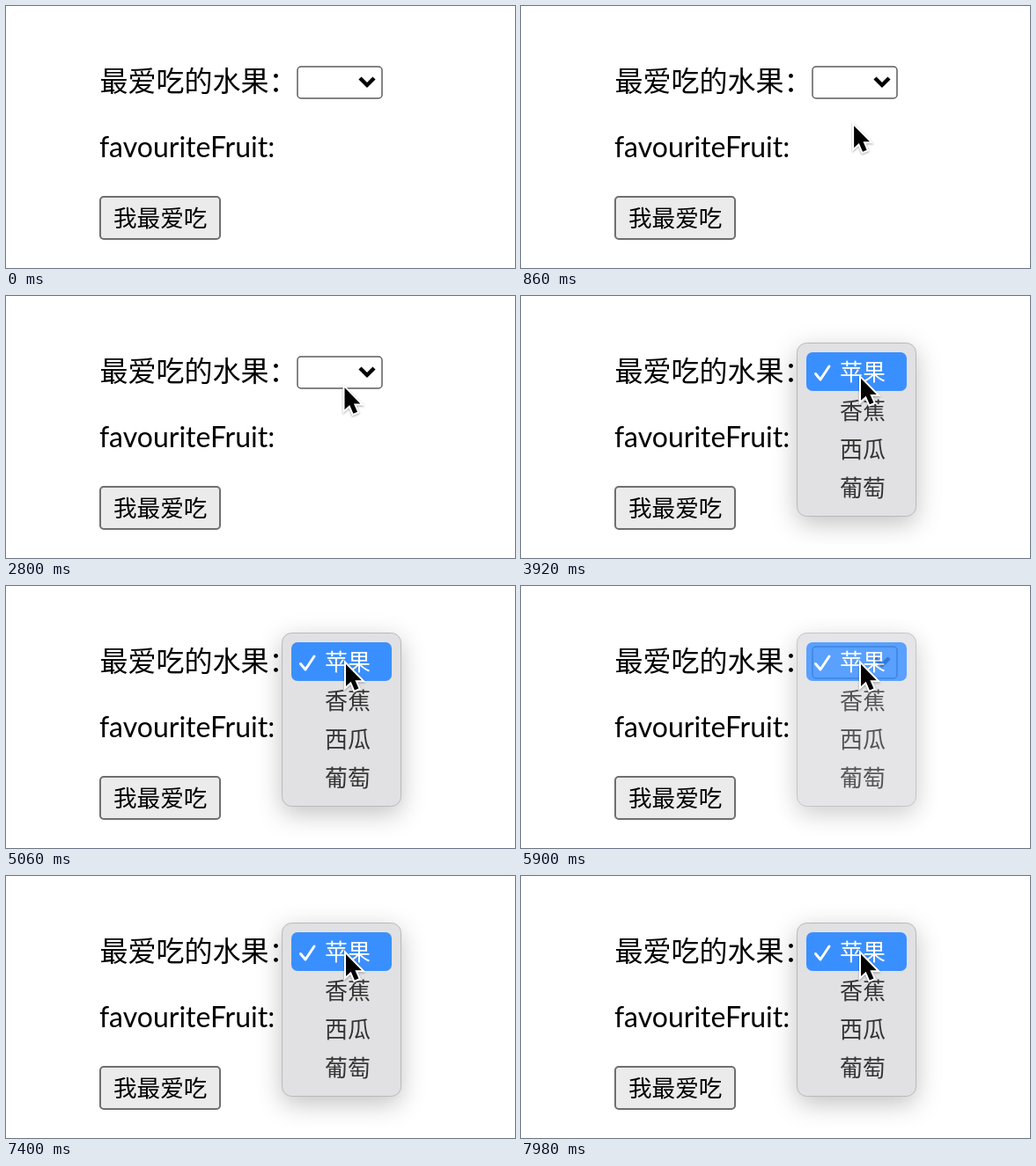
An HTML page for the animation above (8000 ms loop, 578x298 px).

```html
<!DOCTYPE html>
<html lang="zh-CN">
<head>
<meta charset="utf-8">
<style>
  html, body { margin: 0; height: 100%; overflow: hidden; background: #fff; }
  svg { display: block; }
  text { font-family: "Noto Sans CJK SC", "Noto Sans CJK", sans-serif; font-size: 26px; }
  .label { font-size: 32px; }
  .latin { font-family: Lato, sans-serif; font-size: 32px; }
  #box { fill: #fff; stroke: #5c5c5c; stroke-width: 1.5px; }
  #box.hover { stroke: #4f4f4f; }
  #box.focus { stroke: #0655c7; stroke-width: 3.5px; }
  #popup text { fill: #333; }
  #popup.lit text:first-of-type { fill: #fff; font-weight: 500; }
  #popup:not(.lit) #bar { display: none; }
  #popup:not(.lit) #check { stroke: #333; }
  #panel { filter: drop-shadow(0 8px 14px rgba(0, 0, 0, .24)); }
  #pointer { filter: drop-shadow(0 1px 1px rgba(0, 0, 0, .35)); }
</style>
</head>
<body>
<svg width="578" height="298" viewBox="0 0 578 298">
  <text class="label" x="106.5" y="96.5">最爱吃的水果：</text>
  <text class="latin" x="106" y="172">favouriteFruit:</text>
  <text class="latin" id="value" x="313.5" y="172">apple</text>

  <rect x="107" y="217" width="136" height="48" rx="4" fill="#ebebeb" stroke="#6f6f6f" stroke-width="2"/>
  <text x="122" y="251" style="font-size:26.6px">我最爱吃</text>

  <rect id="box" x="331" y="69" width="96" height="36" rx="4"/>
  <text id="choice" x="340.3" y="96">苹果</text>
  <path d="M402 82l8 8 8-8" fill="none" stroke="#000" stroke-width="4.4"/>

  <g id="popup">
    <rect id="panel" x="313.5" y="53.5" width="135" height="197" rx="11" fill="#e1e1e3" stroke="#b9b9bb"/>
    <rect id="bar" x="324" y="64" width="114" height="44" rx="7" fill="#3a8fff"/>
    <path id="check" d="M334.5 88.5l5.5 6.5 10-15" fill="none" stroke="#fff" stroke-width="3" stroke-linecap="round" stroke-linejoin="round"/>
    <text x="362" y="96">苹果</text>
    <text x="362" y="140">香蕉</text>
    <text x="362" y="184">西瓜</text>
    <text x="362" y="228">葡萄</text>
  </g>

  <path id="pointer" d="M0 0V25L5.7 19.8 9.9 29.5 14.5 27.5 10.4 18.2H17.8Z" stroke="#fff" stroke-width="4" paint-order="stroke"/>
</svg>
<script>
const LOOP = 8000, ENTER = 700, OPEN = 3200, CLICK = 5320, FADE = 5620, PICK = 6440, REOPEN = 7400;

const $ = id => document.getElementById(id);
const show = (id, on) => { $(id).style.display = on ? "" : "none"; };
const progress = (t, from, to) => Math.min(1, Math.max(0, (t - from) / (to - from)));
const easeOut = p => 1 - (1 - p) ** 3;

function pointerAt(t) {
  let x = 463, y = 221;
  const move = (from, to, dx, dy) => {
    const k = easeOut(progress(t, from, to));
    x += dx * k;
    y += dy * k;
  };
  move(ENTER, 900, -85.5, -85.5);     // enter the stage
  move(1400, 1800, 7, -31);           // approach the box
  move(2800, 3060, 1.5, -15.5);       // hover over it
  move(3640, 4500, 0, 7);             // drift down and back
  move(4760, 5060, 0, -7);
  x += 4 * Math.sin(Math.PI * progress(t, REOPEN + 300, REOPEN + 440));
  return [x, y];
}

function draw(t) {
  const picked = t >= PICK;
  show("value", picked);
  show("choice", picked);
  $("box").setAttribute("class", picked ? "focus" : t >= 2880 ? "hover" : "");

  const fade = picked ? 0 : progress(t, FADE, PICK - 20);
  const blink = t >= CLICK && t < CLICK + 80;
  show("popup", t >= OPEN && !picked || t >= REOPEN);
  $("popup").setAttribute("class", blink ? "" : "lit");
  $("popup").setAttribute("opacity", 1 - fade ** 1.75);

  show("pointer", t >= ENTER);
  $("pointer").setAttribute("transform", `translate(${pointerAt(t)})`);
}

function tick() {
  draw(performance.now() % LOOP);
  requestAnimationFrame(tick);
}
tick();
</script>
</body>
</html>
```
